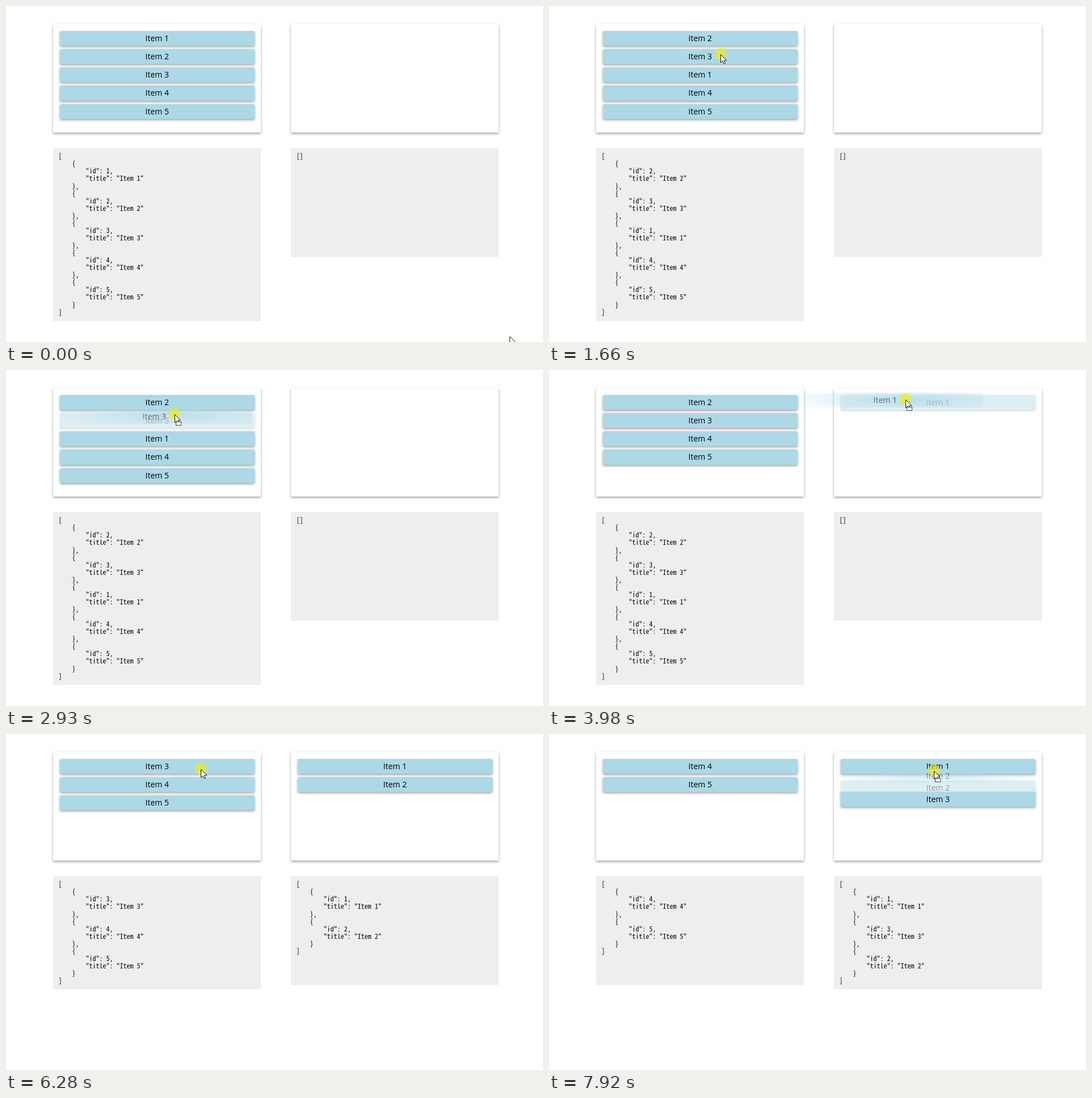
Write an HTML page that moves like this. It is 946 px wide and 592 px high and loops after 8 s.

```html
<!DOCTYPE html>
<html lang="en">
<head>
<meta charset="utf-8">
<title>Drag and drop lists</title>
<style>
html, body { margin: 0; width: 100%; height: 100%; overflow: hidden; background: #fff; }
#stage { position: absolute; left: 0; top: 0; width: 946px; height: 592px; overflow: hidden; }
#stage > * { position: absolute; box-sizing: border-box; }
.panel, .item { box-shadow: 0 2px 4px rgba(0,0,0,.38); }
.panel { top: 32px; width: 366.4px; height: 191.4px; background: #fff; }
.item, .drag {
  width: 342.6px; height: 26.4px; border-radius: 2px; background: #add8e6; color: #000;
  font: 14px/26.4px "Open Sans", "Noto Sans", sans-serif; text-align: center;
}
.json {
  top: 250px; width: 366.4px; min-height: 191.5px; margin: 0; padding: 7.3px 9.6px;
  background: #eee; color: #000; overflow: hidden; white-space: pre;
  font-family: "Noto Sans Mono CJK KR", "Noto Sans Mono CJK JP", "Noto Sans Mono", "Liberation Mono", monospace;
  line-height: 13.07px;
}
.drag { z-index: 10; }
#cursor { left: 0; top: 0; width: 40px; height: 40px; overflow: visible; z-index: 11; }
</style>
</head>
<body>
<div id="stage"></div>
<script>
const LOOP = 8000, SHIFT = 100, TICK = 5;
const PANEL_X = [83, 502], PANEL_W = 366.4, PITCH = 32.3, LINE = 13.07;
const HOME = { x: 887, y: 582 };

// Pointer moves: start, end, x, y, dragging. It rests in between.
const MOVES = [
  [60, 680, 302, 57], [780, 1040, 302, 117, true],
  [1250, 1580, 302, 85], [1720, 2150, 302, 144, true], [2480, 2920, 297, 78, true],
  [3080, 3280, 302, 120], [3620, 3960, 628, 52, true],
  [4140, 4780, 333, 57], [4930, 5330, 628, 62, true],
  [5850, 6260, 343, 62], [6330, 6700, 682, 72, true],
  [7090, 7420, 678, 112], [7785, 7920, 678, 65, true]
].map(([start, end, x, y, dragging]) => ({ start, end, x, y, dragging }));

const slotX = side => PANEL_X[side] + 12;
const slotY = slot => 43.5 + slot * PITCH;
const clamp = (v, lo, hi) => Math.max(lo, Math.min(hi, v));
const ease = k => k * k * (3 - 2 * k);

function pointerAt(t) {
  const i = MOVES.findLastIndex(m => m.start <= t);
  if (i < 0) return HOME;
  const a = MOVES[i - 1] || HOME, b = MOVES[i];
  const k = ease(clamp((t - b.start) / (b.end - b.start), 0, 1));
  return { x: a.x + (b.x - a.x) * k, y: a.y + (b.y - a.y) * k };
}

// A grab runs from the end of a free move to the start of the next one.
const grabs = MOVES.flatMap((m, i) => {
  if (m.dragging) return [];
  const next = MOVES.slice(i + 1).find(n => !n.dragging);
  return { press: m.end, start: MOVES[i + 1].start, drop: next ? next.start : LOOP, x: m.x, y: m.y };
});
const grabAt = t => grabs.find(g => t >= g.press && t < g.drop);

function pick(grab, lists) {
  grab.side = grab.x < PANEL_X[1] ? 0 : 1;
  grab.slot = Math.floor((grab.y - slotY(0)) / PITCH);
  grab.id = lists[grab.side][grab.slot];
}

// Take the item out and put it where it is dragged; the right list keeps its head.
function reorder(lists, grab, { x, y }) {
  const now = lists[0].includes(grab.id) ? 0 : 1;
  const over = PANEL_X.findIndex(left => x >= left && x <= left + PANEL_W);
  const side = over < 0 ? now : over;
  const result = lists.map(list => list.replace(grab.id, ""));
  const rest = result[side];
  const wanted = Math.round(grab.slot + (y - grab.y) / PITCH);
  const slot = Math.min(rest.length, Math.max(side, wanted));
  result[side] = rest.slice(0, slot) + grab.id + rest.slice(slot);
  return result;
}

// Play the drags once and note every change of order.
function playDrags() {
  let lists = ["12345", ""];
  const log = [{ t: 0, lists }];
  for (let t = 0; t < LOOP; t += TICK) {
    const grab = grabAt(t);
    if (!grab || t < grab.start) continue;
    if (!grab.id) pick(grab, lists);
    const next = reorder(lists, grab, pointerAt(t));
    if (next.join() !== lists.join()) log.push({ t, lists: lists = next });
  }
  return log;
}
const log = playDrags();
const stepAt = t => log.findLastIndex(s => s.t <= t);

const stage = document.getElementById("stage");

function add(cls, left = 0) {
  const el = document.createElement(cls === "json" ? "pre" : "div");
  el.className = cls;
  el.style.left = left + "px";
  stage.append(el);
  return el;
}

function place(el, x, y) {
  el.style.left = x + "px";
  el.style.top = y + "px";
}

const show = (el, on) => el.style.display = on ? "" : "none";

PANEL_X.forEach(x => add("panel", x));
const jsons = PANEL_X.map(x => add("json", x));
const items = {};
for (const id of "12345") {
  items[id] = add("item");
  items[id].textContent = "Item " + id;
}
const drag = add("drag");
stage.insertAdjacentHTML("beforeend", `
  <svg id="cursor">
    <circle id="press" cy="-.5" r="10.5" fill="rgba(245,240,0,.6)"/>
    <path d="M.5.5v14.2l3.3-3 2.3 5 2.3-1-2.2-4.8h4.6z" fill="#fff" stroke="#111"/>
    <g id="badge">
      <rect x="2.5" y="13.5" width="9" height="6" fill="#fff" stroke="#888"/>
      <rect x="2.5" y="13.5" width="9" height="6" fill="none" stroke="#000" stroke-dasharray="1 1"/>
    </g>
  </svg>`);
const [cursor, press, badge] = ["cursor", "press", "badge"].map(id => document.getElementById(id));

// Pick the size that gives the code a 6px character pitch.
const pen = document.createElement("canvas").getContext("2d");
pen.font = "100px " + getComputedStyle(jsons[0]).fontFamily;
const codeSize = 600 / pen.measureText("0").width;
jsons.forEach(el => el.style.fontSize = codeSize + "px");

function drawItems(t, active) {
  const i = stepAt(t), now = log[i], old = log[Math.max(0, i - 1)];
  const k = Math.min(1, (t - now.t) / SHIFT);
  now.lists.forEach((list, side) => [...list].forEach((id, slot) => {
    const from = old.lists[side].indexOf(id);
    const y = from < 0 ? slot : from + (slot - from) * k;
    place(items[id], slotX(side), slotY(y));
    items[id].style.opacity = active && active.id === id ? .4 : 1;
    items[id].style.zIndex = slot;
  }));
}

// The code shows the order as of the last drop.
function drawJson(t) {
  const last = grabs.findLast(g => g.drop <= t);
  const { lists } = log[stepAt(last ? last.drop : 0)];
  jsons.forEach((el, side) => {
    const data = [...lists[side]].map(id => ({ id: +id, title: "Item " + id }));
    const text = JSON.stringify(data, null, 4);
    if (el.textContent === text) return;
    el.textContent = text;
    el.style.height = text.split("\n").length * LINE + 17.5 + "px";
  });
}

function drawDrag(active, { x, y }) {
  show(drag, active);
  if (!active) return;
  const left = slotX(active.side) + x - active.x;
  const top = slotY(active.slot) + y - active.y;
  place(drag, left, top);
  drag.textContent = "Item " + active.id;
  const mask = `radial-gradient(220px 28px at ${x - left}px ${y - top}px, rgba(0,0,0,.7), transparent)`;
  drag.style.webkitMaskImage = drag.style.maskImage = mask;
}

function render(t) {
  const pointer = pointerAt(t);
  const held = grabAt(t);
  const active = held && t >= held.start ? held : null;
  drawItems(t, active);
  drawJson(t);
  drawDrag(active, pointer);
  cursor.style.transform = `translate(${Math.round(pointer.x)}px, ${Math.round(pointer.y)}px)`;
  show(press, held);
  show(badge, active);
}

const begin = performance.now();
function tick() {
  render((performance.now() - begin) % LOOP);
  requestAnimationFrame(tick);
}
tick();
</script>
</body>
</html>
```
